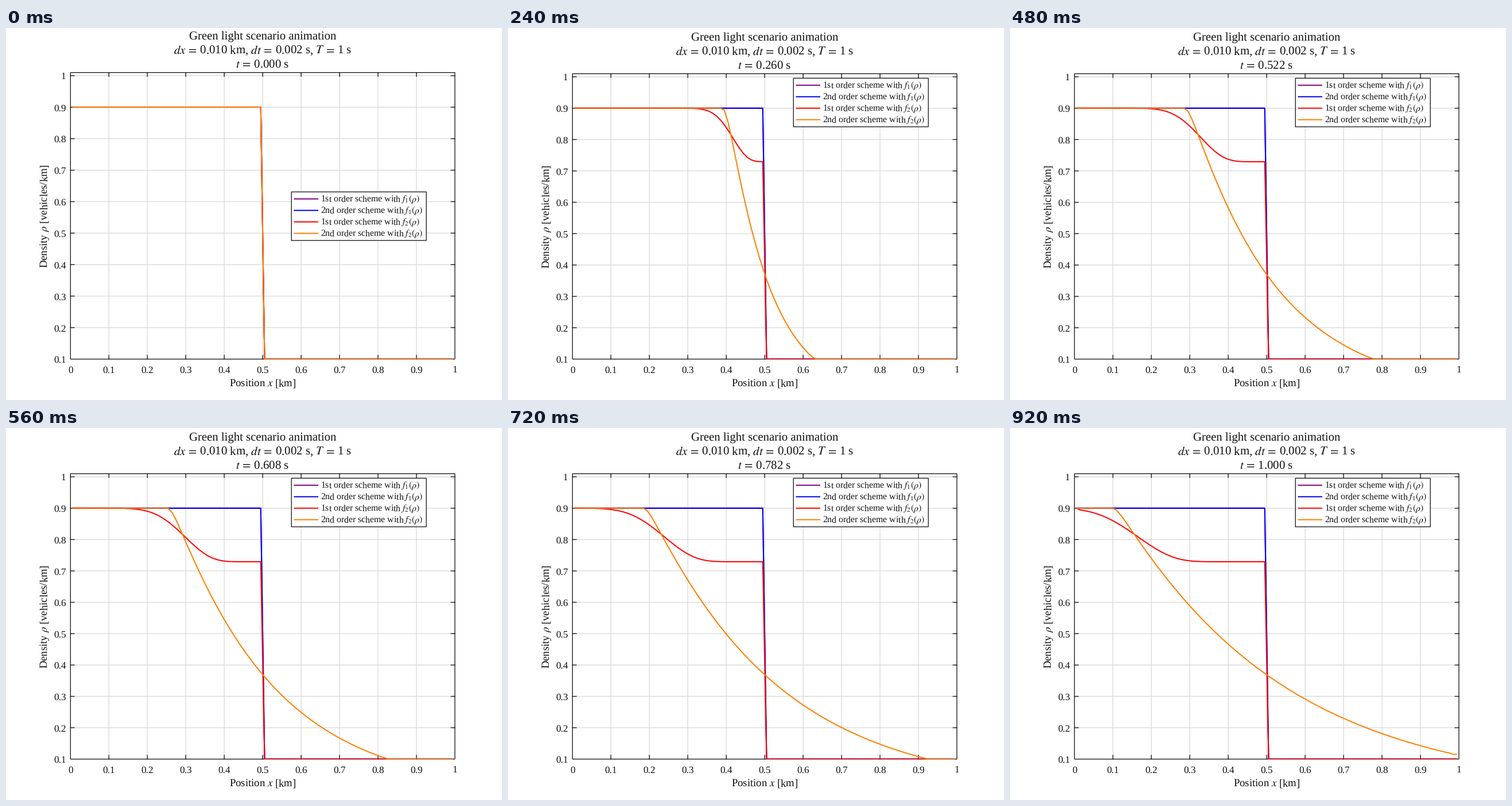
A matplotlib script that plays this animation: 864 px wide and 648 px high, repeating every 960 ms.

```python
import numpy as np
import matplotlib.pyplot as plt
from matplotlib.animation import FuncAnimation
from matplotlib.patches import Rectangle

plt.rcParams["font.family"] = "Liberation Serif"
plt.rcParams["mathtext.fontset"] = "stix"
plt.rcParams["text.hinting"] = "no_hinting"
plt.rcParams["path.snap"] = False

W, H = 864, 648
FRAMES, INTERVAL = 24, 40
DX, DT, STEPS = 0.01, 0.002, 500
LEFT, RIGHT, BOTTOM = 0.13 * W, 0.905 * W, 0.89 * H
Y_MIN, Y_MAX = 0.1, 1.01
BLACK, GRID = "#111111", "#d9d9d9"
SERIES = [
    ("1st order scheme with $f_1(\\rho)$", "#800080"),
    ("2nd order scheme with $f_1(\\rho)$", "#0000ff"),
    ("1st order scheme with $f_2(\\rho)$", "#ff0000"),
    ("2nd order scheme with $f_2(\\rho)$", "#ff8000"),
]
EQ = r"\hspace{0.185}=\hspace{0.185}"

x = np.arange(DX / 2, 1, DX)


# Traffic flow model: two flux laws, Roe scheme and its limited extension

def flux_1(u):
    return u * (1 - u)


def flux_2(u):
    return -u * np.log10(u)


def roe(f, left, right):
    fl, fr = f(left), f(right)
    speed_sign = (fr - fl) * (right - left)
    return np.where(speed_sign >= 0, fl, fr)


def limited_slope(u):
    """Monotonized central slopes, zero in the end cells."""
    d = np.diff(u)
    a, b = d[:-1], d[1:]
    size = np.minimum(2 * np.minimum(np.abs(a), np.abs(b)), np.abs(a + b) / 2)
    s = np.zeros_like(u)
    s[1:-1] = np.where(a * b > 0, np.sign(a) * size, 0)
    return s


def advance(f, u, limited):
    s = limited_slope(u) if limited else np.zeros_like(u)
    flow = roe(f, (u + s / 2)[:-1], (u - s / 2)[1:])
    new = u.copy()
    new[1:-1] -= DT / DX * np.diff(flow)
    new[-1] = new[-2]
    return new


def solve(f, second_order):
    u = np.where(x < 0.5, 0.9, 0.1)
    history = [u]
    for _ in range(STEPS):
        new = advance(f, u, second_order)
        if second_order:
            new = (u + advance(f, new, True)) / 2
        u = new
        history.append(u)
    return history


runs = [solve(f, order) for f in (flux_1, flux_2) for order in (False, True)]

fig = plt.figure(figsize=(W / 72, H / 72), dpi=72, facecolor="white")
ax = fig.add_axes([0, 0, 1, 1])


def label(px, py, text, size, ha="center", **kw):
    ax.text(px, py, text, fontsize=size, ha=ha, va="baseline",
            color=BLACK, zorder=8, **kw)


def stroke(xs, ys, color=BLACK, width=1.3, z=3, **kw):
    return ax.plot(xs, ys, color=color, lw=width, zorder=z, **kw)[0]


def to_x(v):
    return LEFT + v * (RIGHT - LEFT)


def draw_axes(top, to_y):
    for k in range(11):
        v = k / 10
        px = to_x(v)
        if 0 < k < 10:
            stroke([px, px], [top, BOTTOM], GRID, 1.3, 1)
            stroke([px, px], [BOTTOM, BOTTOM - 6.7])
            stroke([px, px], [top, top + 6.7])
        label(px, 600.4, f"{v:g}", 17.3)
        if k > 0:
            py = to_y(v)
            if k > 1:
                stroke([LEFT, RIGHT], [py, py], GRID, 1.3, 1)
                stroke([LEFT, LEFT + 6.7], [py, py])
                stroke([RIGHT, RIGHT - 6.7], [py, py])
            label(104.5, py + 6.4, f"{v:g}", 17.3, "right")
    ax.add_patch(Rectangle((LEFT, top), RIGHT - LEFT, BOTTOM - top,
                           fill=False, ec=BLACK, lw=1.3, zorder=3))


def draw_legend(top):
    ax.add_patch(Rectangle((497.2, top), 235, 84.6, fc="white", ec=BLACK,
                           lw=1.3, zorder=6))
    for k, (name, color) in enumerate(SERIES):
        py = top + 12.2 + 20 * k
        stroke([501.5, 544], [py, py], color, 2, 7, solid_capstyle="butt")
        label(548.4, py + 5.3, name, 15.8, "left")


def draw(i):
    ax.clear()
    ax.set_xlim(0, W)
    ax.set_ylim(H, 0)
    ax.axis("off")

    step = round(i * STEPS / (FRAMES - 1))
    shift = 0 if i == 0 else 2
    top = 77.6 + shift

    def to_y(v):
        return BOTTOM - (v - Y_MIN) / (Y_MAX - Y_MIN) * (BOTTOM - top)

    draw_axes(top, to_y)
    clip = Rectangle((LEFT, top), RIGHT - LEFT, BOTTOM - top + 0.6,
                     transform=ax.transData)
    for (_, color), run in zip(SERIES, runs):
        line = stroke(to_x(x), to_y(run[step]), color, 2, 5,
                      solid_joinstyle="round", solid_capstyle="butt")
        line.set_clip_path(clip)
    draw_legend(285.5 if i == 0 else 87.5)

    mid = (LEFT + RIGHT) / 2
    label(mid, 20.2 + shift, "Green light scenario animation", 20.8)
    label(mid, 44.4 + shift, f"$dx{EQ}$0.010 km, $dt{EQ}$0.002 s, $T{EQ}$1 s",
          20.9)
    label(mid, 69.4 + shift, f"$t{EQ}${step * DT:.3f} s", 20.9)
    label(mid, 624.2, "Position $x$ [km]", 18.7)
    label(72.6, 327.2 + shift / 2, "Density $\\rho$ [vehicles/km]", 18.7,
          rotation=90, rotation_mode="anchor")
    return ax.lines


anim = FuncAnimation(fig, draw, frames=FRAMES, interval=INTERVAL,
                     repeat=True, repeat_delay=0, blit=False)
plt.show()
```
